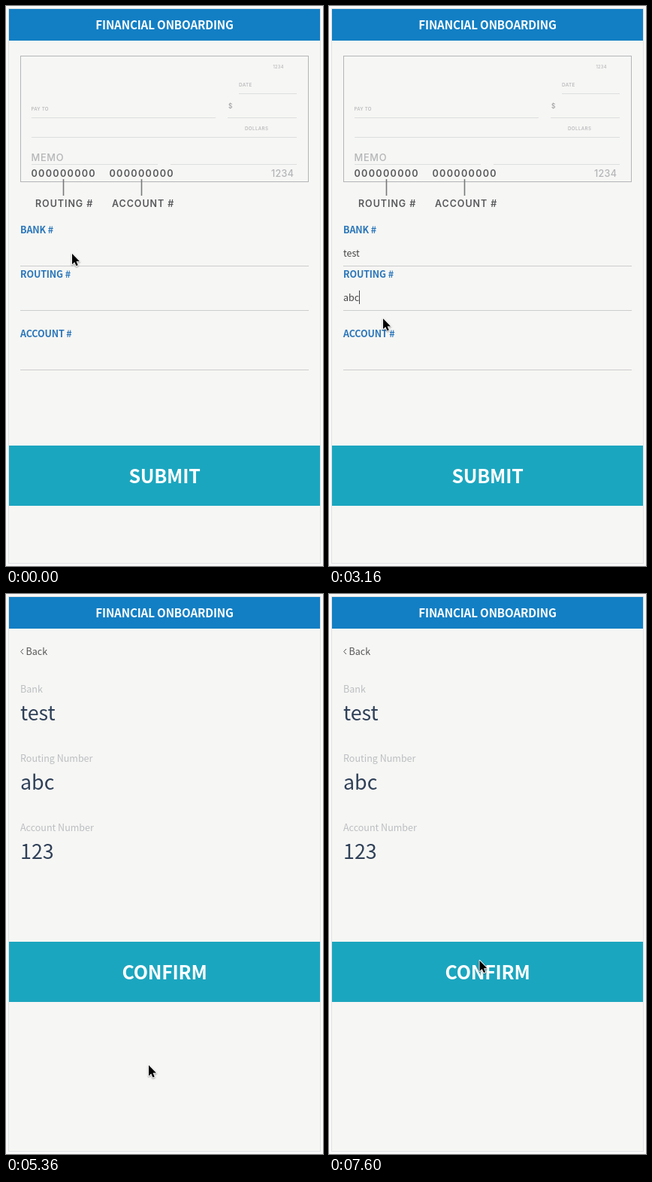
Recreate the animation shown at these times as an HTML page with a canvas. Size 422 by 744 pixels, loop 8000 ms.

```html
<!DOCTYPE html>
<html lang="en">
<head>
<meta charset="utf-8">
<title>Financial Onboarding</title>
<style>
  html, body { margin: 0; width: 100%; height: 100%; overflow: hidden; background: #f7f7f6; }
  canvas { display: block; width: 422px; height: 744px; }
</style>
</head>
<body>
<canvas id="stage" width="422" height="744"></canvas>
<script>
const ctx = document.getElementById('stage').getContext('2d');
const LOOP = 8000;
const SANS = '"Noto Sans CJK SC", "Noto Sans CJK JP", "Noto Sans CJK KR", "Open Sans", sans-serif';
const GEO = 'Inter, Lato, sans-serif';
const TEAL = '#1ba6bf';

// keys: time at which each character appears; on: spans with a visible caret
const fields = [
  { label: 'BANK #', y: 297, text: 'test', keys: [500, 600, 760, 830], on: [[30, 1330]], caret: '#3a78a8' },
  { label: 'ROUTING #', y: 356, text: 'abc', keys: [2460, 2760, 2930], on: [[1700, 2200], [2460, 3430]], caret: '#444' },
  { label: 'ACCOUNT #', y: 435, text: '123', keys: [4060, 4230, 4460], on: [[3730, 4960]], caret: '#444' }
];

// [time, x, y] of the pointer tip
const path = [
  [0, 88, 329], [1030, 88, 329], [1300, 65.5, 408], [1460, 66, 392],
  [2990, 66, 392], [3160, 72, 415], [3530, 94, 468],
  [4490, 94, 468], [5000, 190, 626],
  [6330, 190, 626], [6830, 108, 216], [6960, 107.5, 223], [7160, 123, 279],
  [7600, 200.5, 487], [LOOP, 200.5, 487]
];
const hidden = [[500, 1060], [2460, 3000], [4060, 4500]];

const within = (spans, t) => spans.some(([a, b]) => t >= a && t < b);

function slope(i, k) {
  const a = path[i], b = path[i + 1];
  return (b[k] - a[k]) / (b[0] - a[0]);
}

// Tangent that never overshoots a turning point
function tangent(i, k) {
  if (i === 0 || i === path.length - 1) return 0;
  const a = slope(i - 1, k), b = slope(i, k);
  return a * b > 0 ? 2 * a * b / (a + b) : 0;
}

function pointAt(t, k) {
  let i = 0;
  while (i < path.length - 2 && t >= path[i + 1][0]) i++;
  const a = path[i], b = path[i + 1], d = b[0] - a[0];
  const u = (t - a[0]) / d, u2 = u * u, u3 = u2 * u;
  return a[k] * (2 * u3 - 3 * u2 + 1) + b[k] * (3 * u2 - 2 * u3)
    + d * (tangent(i, k) * (u3 - 2 * u2 + u) + tangent(i + 1, k) * (u3 - u2));
}

function write(str, x, y, font, color, spacing = 0, align = 'left') {
  ctx.font = font;
  ctx.letterSpacing = spacing + 'px';
  ctx.textAlign = align;
  ctx.fillStyle = color;
  ctx.fillText(str, x, y);
}

// The CJK family sets its Latin letters 1.12 times larger
function sans(str, x, y, size, color, weight = 400, align = 'left') {
  const spacing = weight > 400 ? -0.009 * size : 0;
  write(str, x, y, `${weight} ${size / 1.118}px ${SANS}`, color, spacing, align);
}

function geo(str, x, y, size, color, weight, spacing) {
  write(str, x, y, `${weight} ${size}px ${GEO}`, color, spacing);
}

function box(x, y, w, h, color) {
  ctx.fillStyle = color;
  ctx.fillRect(x, y, w, h);
}

const rule = (x1, x2, y, color) => box(x1, y, x2 - x1, 1, color);

function button(label, y) {
  box(4, y, 414, 80, TEAL);
  sans(label, 211, y + 50, 28, '#fff', 700, 'center');
}

function frame() {
  box(0, 0, 422, 744, '#f9f9f9');
  box(4, 4, 414, 736, '#f6f6f4');
  ctx.strokeStyle = '#e0e2e3';
  ctx.lineWidth = 1;
  ctx.strokeRect(3.5, 3.5, 415, 737);
  box(4, 4, 414, 42, '#127fc4');
  sans('FINANCIAL ONBOARDING', 211, 31, 17, '#fff', 700, 'center');
}

function check() {
  const line = '#dcdedf', pale = '#b4b5b7', dark = '#58595b';
  ctx.strokeStyle = '#b3b5b7';
  ctx.strokeRect(19.5, 66.5, 383, 167);
  rule(310, 387, 116, line);
  rule(34, 279, 148, line);
  rule(295, 387, 148, line);
  rule(34, 387, 174, line);
  rule(34, 202, 210, line);
  rule(219, 387, 210, line);
  geo('1234', 355.5, 83, 5.6, pale, 500, 0.3);
  geo('DATE', 310, 107, 6.4, pale, 500, 0.35);
  geo('PAY TO', 33.5, 139, 6.2, pale, 500, 0.2);
  geo('DOLLARS', 318, 165, 6.2, pale, 500, 0.4);
  geo('$', 296, 136, 8.5, '#a0a1a3', 500, 0);
  geo('MEMO', 33.5, 206, 12.8, pale, 500, 0.7);
  geo('000000000', 33.5, 227, 12.6, dark, 600, 1.3);
  geo('000000000', 137.5, 227, 12.6, dark, 600, 1.3);
  geo('1234', 353, 227, 12.6, pale, 500, 0.3);
  box(75.7, 230, 1.6, 22, '#77787a');
  box(179.7, 230, 1.6, 22, '#77787a');
  geo('ROUTING #', 39, 266.5, 12.5, dark, 600, 0.95);
  geo('ACCOUNT #', 141, 266.5, 12.5, dark, 600, 0.95);
}

function form(t) {
  check();
  for (const f of fields) {
    sans(f.label, 19, f.y + 5, 14, '#2a76ba', 700);
    rule(19, 403, f.y + 48, '#cbcdcd');
    const typed = f.text.slice(0, f.keys.filter(k => t >= k).length);
    sans(typed, 19, f.y + 36, 14, '#454545');
    if (within(f.on, t)) {
      const x = Math.floor(19 + ctx.measureText(typed).width);
      box(x, f.y + 22, 1, 18, f.caret);
    }
  }
  button('SUBMIT', 584);
}

function summary() {
  ctx.strokeStyle = '#555';
  ctx.beginPath();
  ctx.moveTo(23, 73);
  ctx.lineTo(19.7, 76.5);
  ctx.lineTo(23, 80);
  ctx.stroke();
  sans('Back', 26.5, 81, 14, '#555');
  ['Bank', 'Routing Number', 'Account Number'].forEach((label, i) => {
    sans(label, 19, 131 + 92 * i, 14, '#bbbec1');
    sans(fields[i].text, 19, 168 + 92 * i, 30, '#2f4058');
  });
  button('CONFIRM', 462);
}

const arrow = new Path2D('M0 0V14.2L3.2 11.2L5.5 16.3L7.8 15.3L5.6 10.3H10Z');

function pointer(t) {
  if (within(hidden, t)) return;
  ctx.save();
  ctx.translate(pointAt(t, 1), pointAt(t, 2));
  ctx.lineJoin = 'round';
  ctx.lineWidth = 1.8;
  ctx.strokeStyle = '#fff';
  ctx.shadowColor = 'rgba(0,0,0,.4)';
  ctx.shadowBlur = 2;
  ctx.shadowOffsetY = 1;
  ctx.stroke(arrow);
  ctx.shadowColor = 'transparent';
  ctx.fillStyle = '#000';
  ctx.fill(arrow);
  ctx.restore();
}

function draw(now) {
  const t = now % LOOP;
  frame();
  if (t < 5360) form(t);
  else summary();
  pointer(t);
  requestAnimationFrame(draw);
}
requestAnimationFrame(draw);
</script>
</body>
</html>
```
